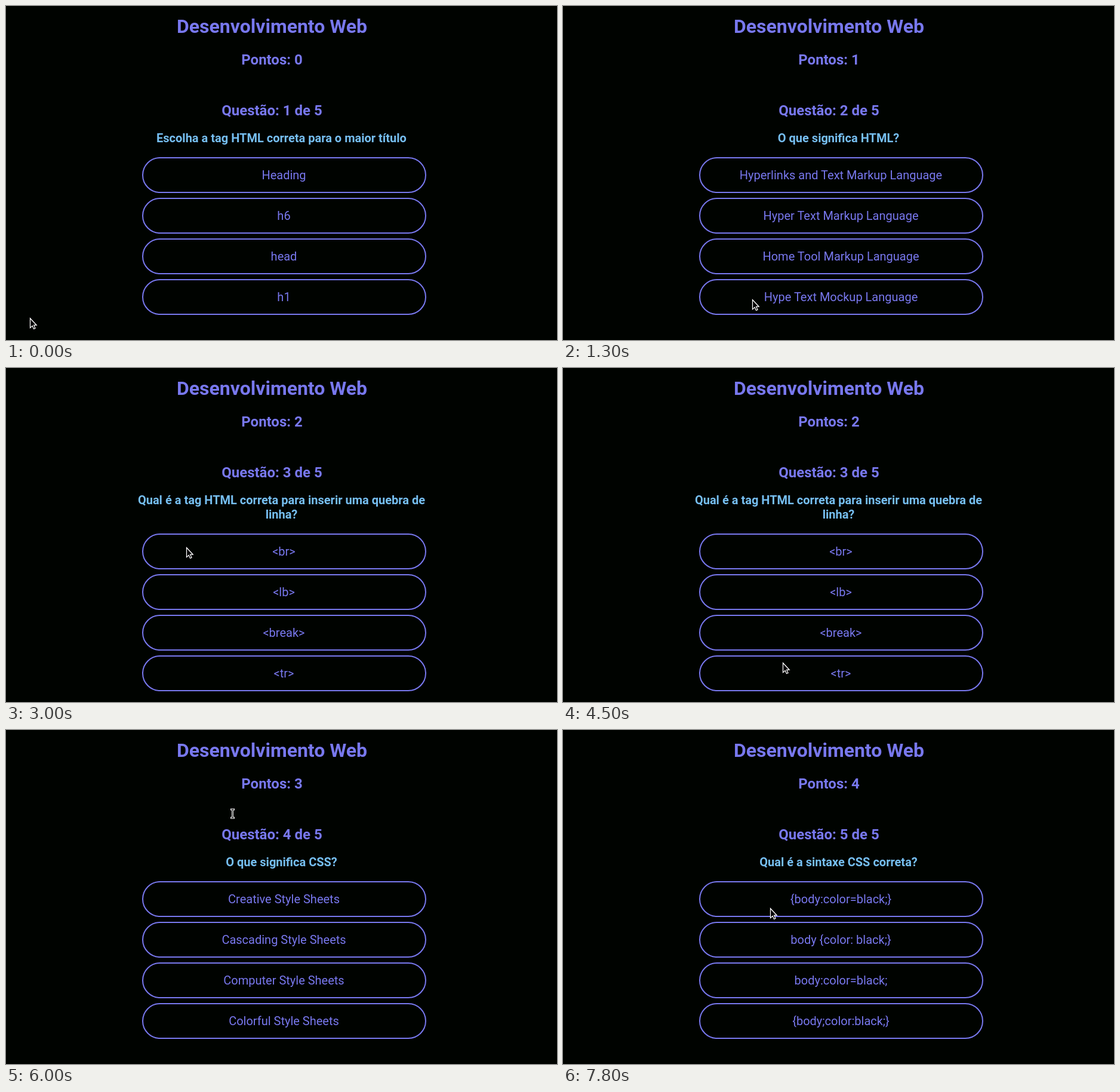
Animation, 923 px wide and 559 px high, one loop 8000 ms. Source, as an HTML page:

```html
<!DOCTYPE html>
<html lang="pt-BR">
<head>
<meta charset="utf-8">
<title>Quiz</title>
<style>
  html, body { margin: 0; width: 100%; height: 100%; overflow: hidden; background: #000300; }
  body { position: relative; color: #7878ee; font: 20px Roboto, sans-serif; text-align: center; }
  h1, h2 { position: absolute; left: 0; width: 891px; margin: 0; }
  h1 { top: 15px; font-size: 32px; }
  h2 { font-size: 24px; }
  #points { top: 76px; }
  #number { top: 161px; }
  #quiz { position: absolute; left: 211.5px; top: 209px; width: 500px; }
  h3 { margin: 0 0 20px; font-size: 20px; color: #76bff1; }
  .option {
    box-sizing: border-box; width: 476px; height: 60px; margin: 0 0 8px 16px;
    border: 2px solid; border-radius: 30px; line-height: 56px;
  }
  svg { position: absolute; left: 0; top: 0; overflow: visible; }
</style>
</head>
<body>
<h1>Desenvolvimento Web</h1>
<h2 id="points"></h2>
<h2 id="number"></h2>
<div id="quiz">
  <h3></h3>
  <div class="option"></div>
  <div class="option"></div>
  <div class="option"></div>
  <div class="option"></div>
</div>
<svg id="cursor" width="14" height="20" fill="none">
  <path id="arrow" fill="#000" stroke="#fff" stroke-width="1.25" d="M.5.7V16.6L4.1 13.2L6.5 18.5L9 17.4L6.7 12.2H11.2Z"/>
  <g id="beam">
    <path stroke="#fff" stroke-width="3" d="M-3-7H4M-3 7H4M.5-7V7"/>
    <path stroke="#000" d="M-2-7H3M-2 7H3M.5-7V7"/>
  </g>
</svg>
<script>
const LOOP = 8000, STEP = 100, BEAM_AT = 6000;

const questions = [
  { at: 0, text: 'Escolha a tag HTML correta para o maior título',
    options: ['Heading', 'h6', 'head', 'h1'] },
  { at: 1300, text: 'O que significa HTML?',
    options: ['Hyperlinks and Text Markup Language', 'Hyper Text Markup Language',
              'Home Tool Markup Language', 'Hype Text Mockup Language'] },
  { at: 3000, text: 'Qual é a tag HTML correta para inserir uma quebra de linha?',
    options: ['<br>', '<lb>', '<break>', '<tr>'] },
  { at: 5400, text: 'O que significa CSS?',
    options: ['Creative Style Sheets', 'Cascading Style Sheets',
              'Computer Style Sheets', 'Colorful Style Sheets'] },
  { at: 6900, text: 'Qual é a sintaxe CSS correta?',
    options: ['{body:color=black;}', 'body {color: black;}',
              'body:color=black;', '{body;color:black;}'] },
];

// The pointer rests at each stop until the next glide begins
const stops = [
  { x: 40, y: 522 },
  { x: 88, y: 513, end: 400, steps: 2 },
  { x: 317, y: 491, end: 900, steps: 4 },
  { x: 222, y: 400, end: 2000, steps: 4 },
  { x: 302, y: 300, end: 2500, steps: 5 },
  { x: 218, y: 340, end: 3800, steps: 4 },
  { x: 364, y: 402, end: 4300, steps: 5 },
  { x: 368, y: 493, end: 4500, steps: 2 },
  { x: 335, y: 251, end: 5200, steps: 6 },
  { x: 379, y: 140, end: 5800, steps: 1 },
  { x: 421, y: 380, end: 6200, steps: 2 },
  { x: 416, y: 342, end: 6700, steps: 3 },
  { x: 414, y: 358, end: 7400, steps: 3 },
  { x: 347, y: 298, end: 7800, steps: 3 },
];

const $ = selector => document.querySelector(selector);
const optionBoxes = document.querySelectorAll('.option');
const clamp = u => Math.min(1, Math.max(0, u));
const ease = u => u * u * (3 - 2 * u);

function pointerAt(time) {
  let { x, y } = stops[0];
  for (const stop of stops.slice(1)) {
    const u = ease(clamp(1 - (stop.end - time) / (stop.steps * STEP)));
    x += (stop.x - x) * u;
    y += (stop.y - y) * u;
  }
  return [Math.round(x), Math.round(y)];
}

let shown = -1;
function showQuestion(index) {
  if (index === shown) return;
  shown = index;
  const { text, options } = questions[index];
  $('#points').textContent = `Pontos: ${index}`;
  $('#number').textContent = `Questão: ${index + 1} de ${questions.length}`;
  $('h3').textContent = text;
  optionBoxes.forEach((box, i) => box.textContent = options[i]);
}

function draw(now) {
  const time = Math.floor(now % LOOP / STEP) * STEP;
  showQuestion(questions.filter(q => q.at <= time).length - 1);
  const [x, y] = pointerAt(time);
  $('#cursor').style.transform = `translate(${x}px, ${y}px)`;
  const overText = time === BEAM_AT;
  $('#arrow').style.display = overText ? 'none' : '';
  $('#beam').style.display = overText ? '' : 'none';
}

const began = performance.now();
function tick() {
  draw(performance.now() - began);
  requestAnimationFrame(tick);
}
tick();
</script>
</body>
</html>
```
